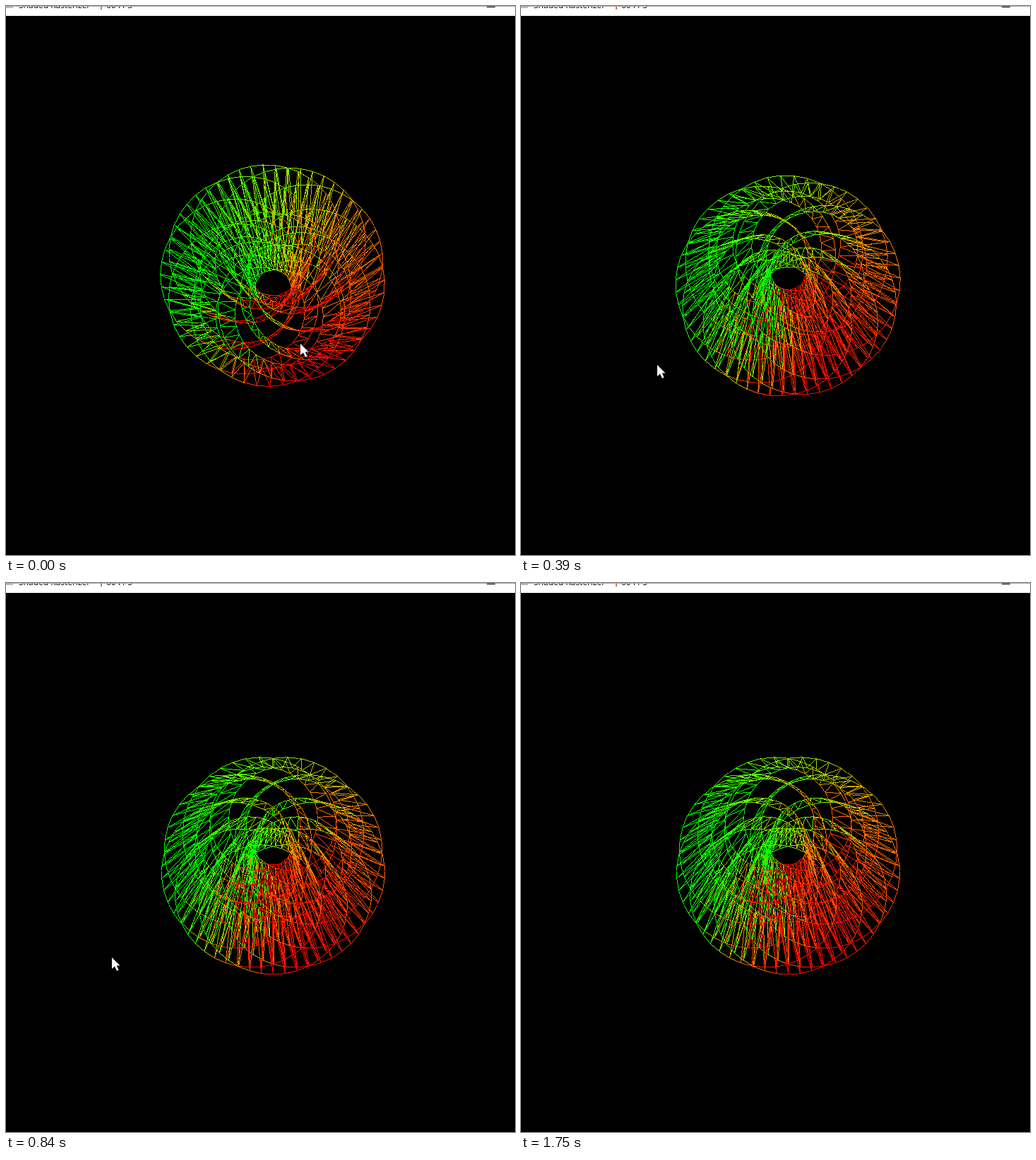
These frames come from a looping animation (721 px wide and 777 px high, 1.85 s). An HTML page with a canvas:

```html
<!DOCTYPE html>
<html>
<head>
<meta charset="utf-8">
<style>
html, body { margin: 0; width: 100%; height: 100%; overflow: hidden; background: #000; }
canvas { display: block; }
</style>
</head>
<body>
<canvas id="stage" width="721" height="777"></canvas>
<script>
const W = 721, H = 777, LOOP = 1850, TAU = Math.PI * 2;
const ctx = document.getElementById('stage').getContext('2d');

// A closed nine-lobed spirograph curve, extruded in depth to a band
const STEPS = 360, TURNS = 10, CIRCLE = 80.5, OFFSET = 51, DEPTH = 85;
const CX = 378, CY = 388, CAMERA = 480;

// Pointer samples [ms, x, y]; dragging turns the band until DRAG_END
const DRAG_END = 690;
const pointer = [
  [0, 417, 478], [150, 334, 492], [270, 262, 500], [390, 193, 508],
  [540, 69, 515], [690, 12, 512], [840, 150, 530], [960, 395, 536],
  [1080, 582, 518], [1230, 610, 570], [1350, 646, 655], [1470, 676, 748],
  [1620, 800, 800]
];
// Share of green every 30 degrees of the wall's direction, counterclockwise from the right
const greens = [0.26, 0.35, 0.51, 0.67, 0.86, 0.98, 1, 0.97, 0.42, 0, 0.03, 0.13];

function colorAt(angle) {
  const k = ((angle / TAU * 12) % 12 + 12) % 12, i = Math.floor(k);
  const g = greens[i] + (greens[(i + 1) % 12] - greens[i]) * (k - i);
  return [1 - g, g].map(v => 255 * Math.min(1, 1.45 * v));
}

const picture = ctx.createImageData(W, H);
const pixels = new Uint32Array(picture.data.buffer);

function line(a, b) {
  const dx = b.x - a.x, dy = b.y - a.y;
  const n = Math.max(1, Math.round(Math.max(Math.abs(dx), Math.abs(dy))));
  for (let i = 0; i <= n; i++) {
    const k = i / n;
    const red = a.color[0] + (b.color[0] - a.color[0]) * k;
    const green = a.color[1] + (b.color[1] - a.color[1]) * k;
    pixels[Math.round(a.y + dy * k) * W + Math.round(a.x + dx * k)] =
      (0xff000000 | green << 8 | red) >>> 0;
  }
}

function drawBand(spin, tilt) {
  const ct = Math.cos(tilt), st = Math.sin(tilt);
  const project = (x, y, z, color) => {
    const scale = CAMERA / (CAMERA - z * ct - y * st);
    return { x: CX + x * scale, y: CY - (y * ct - z * st) * scale, color };
  };
  const rungs = Array.from({ length: STEPS }, (_, i) => {
    const u = i / STEPS * TAU, fast = u * TURNS + spin, slow = u + spin;
    const x = CIRCLE * Math.cos(fast) + OFFSET * Math.cos(slow);
    const y = CIRCLE * Math.sin(fast) + OFFSET * Math.sin(slow);
    const color = colorAt(fast);
    return [project(x, y, DEPTH, color), project(x, y, -DEPTH, color)];
  });
  pixels.fill(0xff000000);
  rungs.forEach(([front, back], i) => {
    const [nextFront, nextBack] = rungs[(i + 1) % STEPS];
    line(front, back);
    line(front, nextFront);
    line(back, nextBack);
    line(back, nextFront);
  });
  ctx.putImageData(picture, 0, 0);
}

function drawTitle() {
  const bar = (color, ...box) => { ctx.fillStyle = color; ctx.fillRect(...box); };
  bar('#fff', 0, 0, W, 14);
  ctx.font = '12px "Open Sans", sans-serif';
  ctx.fillStyle = '#000';
  ctx.fillText('Shaded Rasterizer', 18, 3);
  ctx.fillText('60 FPS', 142, 3);
  bar('#c87a4a', 134, 0, 2, 5);
  bar('#aaa', 0, 0, W, 1);
  bar('#bbb', 0, 1, 10, 2);
  bar('#000', 681, 1, 12, 1);
}

const arrow = new Path2D('M0 0V16L4 12.6L7 19L9.6 17.8L6.8 11.6H11.5Z');
function drawPointer(x, y) {
  ctx.save();
  ctx.translate(x, y);
  ctx.strokeStyle = '#000';
  ctx.stroke(arrow);
  ctx.fillStyle = '#fff';
  ctx.fill(arrow);
  ctx.restore();
}

let shown = -1;
const start = performance.now();
function frame() {
  const t = (performance.now() - start) % LOOP;
  const step = pointer.findLastIndex(s => s[0] <= t);
  if (step !== shown) {
    shown = step;
    const [, x, y] = pointer[step];
    const [, dragX, dragY] = pointer.findLast(s => s[0] <= Math.min(t, DRAG_END));
    drawBand(-Math.PI / 2 + (dragX - 12) * 0.01, (dragY - 492) * 0.01);
    drawTitle();
    drawPointer(x, y);
  }
  requestAnimationFrame(frame);
}
frame();
</script>
</body>
</html>
```
